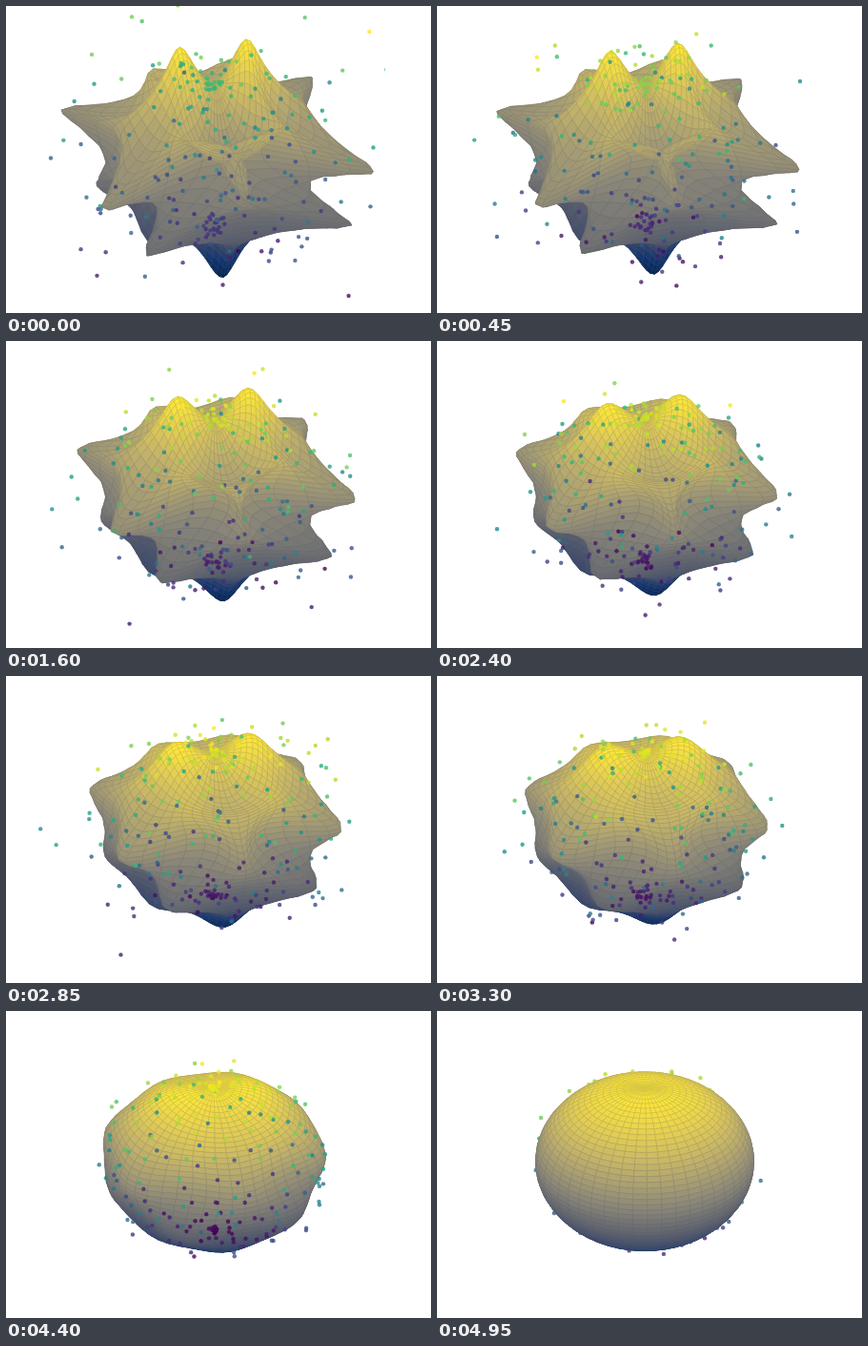
Animation, 446 px wide and 322 px high, one loop 5000 ms. Source, as an HTML page with a canvas:

```html
<!DOCTYPE html>
<html>
<head>
<meta charset="utf-8">
<title>Noisy surface settling into a sphere</title>
<style>
html, body { margin: 0; width: 100%; height: 100%; overflow: hidden; background: #fff; }
canvas { display: block; }
</style>
</head>
<body>
<canvas id="stage" width="446" height="322"></canvas>
<script>
const ctx = document.getElementById('stage').getContext('2d');
const FRAMES = 100, STEP = 50, TAU = 2 * Math.PI;
const WAVE = 5, AMPLITUDE = 0.74;
const ROWS = 50, COLS = 50, GRID = 15;
const CENTER_X = 218, CENTER_Y = 156.5, SCALE = 114.3, FLATTEN = 0.75, PERSPECTIVE = 0.057;
const AZIMUTH = -Math.PI / 3, ELEVATION = Math.PI / 6;
const sinA = Math.sin(AZIMUTH), cosA = Math.cos(AZIMUTH);
const sinE = Math.sin(ELEVATION), cosE = Math.cos(ELEVATION);

const parseMap = text => text.split(' ').map(hex => [0, 2, 4].map(i => parseInt(hex.slice(i, i + 2), 16)));
const CIVIDIS = parseMap('00224e 123570 3b496c 575d6d 707173 8a8678 a59c74 c3b369 e1cc55 fee838');
const VIRIDIS = parseMap('440154 482878 3e4989 31688e 26828e 1f9e89 35b779 6dcd59 b4de2c fde725');

function colorAt(map, t) {
  const x = Math.max(0, Math.min(1, t)) * (map.length - 1);
  const i = Math.min(map.length - 2, Math.floor(x));
  const mix = map[i].map((c, k) => Math.round(c + (map[i + 1][k] - c) * (x - i)));
  return `rgb(${mix})`;
}

function seeded(seed) {
  return () => {
    seed = (seed + 0x6d2b79f5) | 0;
    let t = Math.imul(seed ^ (seed >>> 15), seed | 1);
    t ^= t + Math.imul(t ^ (t >>> 7), t | 61);
    return ((t ^ (t >>> 14)) >>> 0) / 4294967296;
  };
}

const direction = (theta, phi) =>
  [Math.sin(theta) * Math.cos(phi), Math.sin(theta) * Math.sin(phi), Math.cos(theta)];

// Each axis is pushed by the waves of the other two, most strongly near its own ends.
function deform(p, strength) {
  const wave = p.map(c => Math.sin(WAVE * c));
  return p.map((c, i) =>
    c + AMPLITUDE * strength * c * c * wave[(i + 1) % 3] * wave[(i + 2) % 3]);
}

function project([x, y, z]) {
  const toward = x * cosA + y * sinA, up = z * FLATTEN;
  const depth = toward * cosE + up * sinE;
  const k = SCALE / (1 - PERSPECTIVE * depth);
  return {
    x: CENTER_X + k * (y * cosA - x * sinA),
    y: CENTER_Y - k * (up * cosE - toward * sinE),
    z, depth
  };
}

// Colours span the lowest to the highest item of each set.
function heightColors(items, map) {
  const heights = items.map(p => p.z);
  const low = Math.min(...heights), high = Math.max(...heights);
  return z => colorAt(map, (z - low) / (high - low));
}

function drawSurface(strength) {
  const grid = [];
  for (let i = 0; i < ROWS; i++) {
    grid.push([]);
    for (let j = 0; j < COLS; j++) {
      const d = direction(Math.PI * i / (ROWS - 1), TAU * j / (COLS - 1));
      grid[i].push(project(deform(d, strength)));
    }
  }
  const faces = [];
  for (let i = 1; i < ROWS; i++) {
    for (let j = 1; j < COLS; j++) {
      const corners = [grid[i - 1][j - 1], grid[i - 1][j], grid[i][j], grid[i][j - 1]];
      const mean = key => corners.reduce((sum, p) => sum + p[key], 0) / 4;
      faces.push({ corners, z: mean('z'), depth: mean('depth') });
    }
  }
  const color = heightColors(faces, CIVIDIS);
  faces.sort((a, b) => a.depth - b.depth);
  for (const face of faces) {
    ctx.beginPath();
    for (const p of face.corners) ctx.lineTo(p.x, p.y);
    ctx.closePath();
    ctx.fillStyle = ctx.strokeStyle = color(face.z);
    ctx.lineWidth = 0.6;
    ctx.stroke();
    ctx.fill();
    ctx.strokeStyle = 'rgba(105,105,105,0.8)';
    ctx.lineWidth = 0.2;
    ctx.stroke();
  }
}

function drawPoints(strength, frame) {
  const random = seeded(frame * 7919 + 17);
  const normal = () => Math.sqrt(-2 * Math.log(1 - random())) * Math.cos(TAU * random());
  const points = [];
  for (let i = 0; i < GRID; i++) {
    for (let j = 0; j < GRID; j++) {
      const theta = Math.PI * i / (GRID - 1);
      const spread = 0.02 + 0.04 * strength + Math.sin(theta) * (0.02 + 0.4 * strength);
      points.push(project(direction(theta, TAU * j / (GRID - 1)).map(c => c + spread * normal())));
    }
  }
  const color = heightColors(points, VIRIDIS);
  points.sort((a, b) => a.depth - b.depth);
  ctx.globalAlpha = 0.8;
  for (const p of points) {
    ctx.beginPath();
    ctx.arc(p.x, p.y, 2.2, 0, TAU);
    ctx.fillStyle = color(p.z);
    ctx.fill();
  }
  ctx.globalAlpha = 1;
}

function draw(frame) {
  const strength = 1 - frame / (FRAMES - 1);
  ctx.fillStyle = '#fff';
  ctx.fillRect(0, 0, 446, 322);
  ctx.save();
  ctx.beginPath();
  ctx.rect(28, 0, 370, 322);
  ctx.clip();
  const layers = [() => drawSurface(strength), () => drawPoints(strength, frame)];
  if (strength < 0.05) layers.reverse();
  layers.forEach(layer => layer());
  ctx.restore();
}

let shown = -1;
function tick() {
  const frame = Math.floor(performance.now() / STEP) % FRAMES;
  if (frame !== shown) draw(shown = frame);
  requestAnimationFrame(tick);
}
tick();
</script>
</body>
</html>
```
